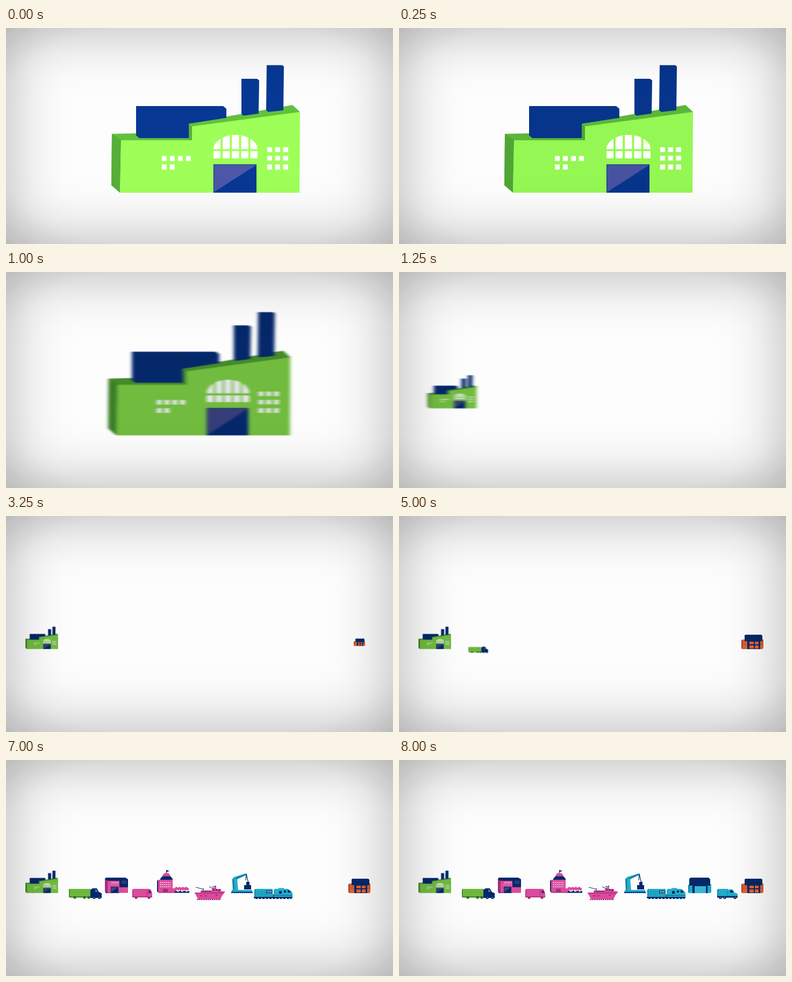
These frames come from a looping animation (720 px wide and 404 px high, 9120 ms). An HTML page without scripts:

```html
<!DOCTYPE html>
<html lang="en">
<head>
<meta charset="utf-8">
<title>Supply chain</title>
<style>
html, body { margin: 0; width: 100%; height: 100%; overflow: hidden; background: #fdfdfd }
svg { display: block; width: 100vw; height: 100vh }
.stage { position: relative; width: 100%; height: 100% }
.stage::after {
  content: ""; position: absolute; inset: 0;
  background: radial-gradient(ellipse 75% 75%, transparent 72%, rgba(0,0,0,.07));
  box-shadow: inset 0 0 110px 6px rgba(0,0,0,.28);
}

.navy { fill: #05286a } .green { fill: #71bb3f } .shade { fill: #458a2c }
.pink { fill: #dc4a9c } .plum { fill: #a32d78 }
.teal { fill: #22aecb } .deep { fill: #12809f }
.orange { fill: #e2622f } .pane { fill: #e6e6ee }
.line { fill: none; stroke: #05286a }
.row { fill: none; stroke: #e6e6ee }

@property --p { syntax: "<number>"; inherits: true; initial-value: 0 }
.smear, .fly, .pop { animation: 9.12s step-end infinite }
.smear { animation-name: smear }
.fly {
  animation-name: fly;
  transform: translate(calc(1.8px * var(--p)), calc(195px * var(--p))) scale(calc(1 - .8255 * var(--p)));
}
.glow { animation: glow 9.12s infinite }
.pop { transform-box: fill-box; transform-origin: 50% 55% }

@keyframes glow {
  0% { filter: brightness(1.4); animation-timing-function: steps(5, end) }
  6.9%, 100% { filter: brightness(1) }
}
@keyframes fly {
  0% { --p: 0 } 10.96% { --p: .04 } 12.38% { --p: .5 } 13.7% { --p: .895 }
  15.12% { --p: .975 } 16.44% { --p: .995 } 17.86%, 100% { --p: 1 }
}
@keyframes smear {
  0% { filter: none } 10.96% { filter: url(#soft) } 12.38% { filter: url(#fast) }
  13.7% { filter: url(#soft) } 15.12%, 100% { filter: none }
}
/* one pop each: hidden, small, overshoot, rest */
@keyframes shop { 0% { transform: scale(0) } 35.62% { transform: scale(.51) } 37.04% { transform: scale(1.08) } 38.36%, 100% { transform: none } }
@keyframes lorry { 0% { transform: scale(0) } 54.8% { transform: scale(.6) } 56.2% { transform: scale(1.08) } 57.5%, 100% { transform: none } }
@keyframes depot { 0% { transform: scale(0) } 58.9% { transform: scale(.6) } 60.3% { transform: scale(1.08) } 61.7%, 100% { transform: none } }
@keyframes van { 0% { transform: scale(0) } 61.7% { transform: scale(.6) } 63% { transform: scale(1.08) } 64.4%, 100% { transform: none } }
@keyframes customs { 0% { transform: scale(0) } 65.78% { transform: scale(.66) } 67.2% { transform: scale(1.08) } 68.5%, 100% { transform: none } }
@keyframes ship { 0% { transform: scale(0) } 68.52% { transform: scale(.6) } 69.9% { transform: scale(1.08) } 71.2%, 100% { transform: none } }
@keyframes crane { 0% { transform: scale(0) } 69.9% { transform: scale(.6) } 71.2% { transform: scale(1.08) } 72.6%, 100% { transform: none } }
@keyframes train { 0% { transform: scale(0) } 72.6% { transform: scale(.6) } 74% { transform: scale(1.08) } 75.4%, 100% { transform: none } }
@keyframes store { 0% { transform: scale(0) } 78.1% { transform: scale(.6) } 79.5% { transform: scale(1.08) } 80.9%, 100% { transform: none } }
@keyframes pickup { 0% { transform: scale(0) } 83.6% { transform: scale(.6) } 85% { transform: scale(1.08) } 86.3%, 100% { transform: none } }
</style>
</head>
<body>
<div class="stage">
<svg viewBox="0 0 720 404" preserveAspectRatio="none">
  <defs>
    <filter id="soft" x="-20%" y="-10%" width="140%" height="120%" color-interpolation-filters="sRGB"><feGaussianBlur stdDeviation="3.2 .5"/></filter>
    <filter id="fast" x="-20%" y="-10%" width="140%" height="120%" color-interpolation-filters="sRGB"><feGaussianBlur stdDeviation="13 1.5"/></filter>
    <clipPath id="arch"><ellipse cx="427" cy="227" rx="41" ry="27"/></clipPath>
    <g id="wheel"><circle r="2.6" class="navy"/><circle r="1" fill="#8fa0c4"/></g>
  </defs>

  <!-- factory -->
  <g class="smear"><g class="fly"><g class="glow">
    <path class="shade" d="M197 198L243 197 340 204 346 184 340 178 533 144 547 157 346 212H214L212 308 196 294Z"/>
    <path fill="#3d7d28" d="M197 198L214 210 212 308 196 294ZM340 178L346 184V211L340 207Z"/>
    <path class="green" d="M214 210H346V184L547 157 546 308H212Z"/>
    <path class="navy" d="M242 146H404L410 151V168L340 179V206H248L242 201ZM438 95H467L471 98 470 160 442 164 438 161ZM485 69.500H514L517 72 516 154 488 157 484 154Z"/>
    <g class="row" stroke-width="9">
      <path stroke-dasharray="9 6" d="M290 244H344M290 260H314"/>
      <path stroke-dasharray="9 5.800" d="M486 227.500H524.600M486 243.500H524.600M486 260H524.600"/>
    </g>
    <path class="row" stroke-width="13" stroke-dasharray="13 4.200" d="M386 237H468"/>
    <path class="row" stroke-width="27" stroke-dasharray="13 4.200" d="M386 213H468" clip-path="url(#arch)"/>
    <path class="navy" d="M386 255H466V308H386Z"/>
    <path fill="#363e79" d="M387 256H466L387 307Z"/>
  </g></g></g>

  <!-- shop -->
  <g class="pop" style="animation-name:shop">
    <path class="orange" d="M637 232L640 231H678V247L676 249H639L637 247Z"/>
    <path class="navy" d="M643 223L645 222H674L676 224V234H672V249H648V234H643Z"/>
    <path fill="#9b3c2c" d="M637 232L639 233V249L637 247Z"/>
    <path class="orange" d="M652 235H660V240H652ZM662 235H669V240H662ZM652 242H660V248H652ZM662 242H669V248H662Z"/>
    <path class="line" stroke-width="1" stroke-dasharray="1 2" d="M641 236H648M641 240H648M673 236H678M673 240H678"/>
  </g>

  <!-- green lorry -->
  <g class="pop" style="animation-name:lorry">
    <path class="shade" d="M117 242L119 241V257H117ZM119 254H160V257.500H119Z"/>
    <path class="green" d="M119 241H157L159 243V255H119Z"/>
    <path fill="none" stroke="#5aa336" stroke-width="9" stroke-dasharray=".7 3" d="M122 248H158"/>
    <path class="navy" d="M157 243L161 240H169L173 247 178 249V258H157Z"/>
    <path fill="#4d69a5" d="M166 242H168.500L171 247H166Z"/>
    <g fill="#2f6b24"><circle cx="128" cy="257" r="2.700"/><circle cx="146" cy="257" r="2.700"/><circle cx="154" cy="257" r="2.700"/></g>
    <use href="#wheel" x="164" y="257.500"/><use href="#wheel" x="174" y="257.500"/>
  </g>

  <!-- depot -->
  <g class="pop" style="animation-name:depot">
    <path class="navy" d="M184 222L186 220H222L227 223V240H211V249H186L184 246Z"/>
    <path class="pink" d="M189 226H211V238H227V248.500H189Z"/>
    <path class="plum" d="M184 223L189 226V248.500L184 246Z"/>
    <path class="row" stroke-width="2.500" stroke-dasharray="2 .8" stroke-opacity=".65" d="M196 229.500H210"/>
    <path class="row" stroke-width="1" stroke-dasharray="1.500 1.500" stroke-opacity=".7" d="M216 227H225M216 230H225M194 233.500H210"/>
    <path class="navy" d="M195 237H209V248.500H195Z"/>
    <path fill="#3c4582" d="M196 238H208L196 247Z"/>
  </g>

  <!-- pink van -->
  <g class="pop" style="animation-name:van">
    <path class="pink" d="M235 243L237 241H267L270 243 272 250V257H235Z"/>
    <path class="plum" d="M235 243L236.500 242V257H235ZM262 243H263V256H262ZM236 255.500H272V257H236Z"/>
    <path class="navy" d="M265 244H268.500L270.500 249H265Z" opacity=".75"/>
    <g class="plum"><circle cx="242" cy="257.500" r="2.500"/><circle cx="266" cy="257.500" r="2.500"/></g>
  </g>

  <!-- customs house and pier -->
  <g class="pop" style="animation-name:customs">
    <path class="line" d="M298.500 206V212"/>
    <path class="navy" d="M298 205.500L304 207.500 298 210Z"/>
    <path class="pink" d="M291 218Q292 211 298.500 211T306 218Z"/>
    <path class="navy" d="M287 222L291 217.500H306L310 222V225H287ZM281 226L284 224V248L281 246Z"/>
    <path class="pink" d="M283 224H310V248H283ZM310 240H315V248H310Z"/>
    <path class="row" stroke-width="1.800" stroke-dasharray="1.800 2" d="M287 229H307M287 233H307M287 237H307"/>
    <path class="plum" d="M292 241H301V248H292ZM283 247H314V248.500H283Z"/>
    <path class="pink" d="M314 239L317 237 320 239 323 237 326 239 329 237 332 239 335 237 340 240V243H314Z"/>
    <path fill="none" stroke="#dc4a9c" stroke-width="4" stroke-dasharray="1.500 3" d="M315 243H340"/>
    <path class="navy" d="M314 246Q316 243.500 318 245.500T322 245.500 326 245.500 330 245.500 334 245.500 338 245.500L341 245V248.500H314Z"/>
  </g>

  <!-- ship -->
  <g class="pop" style="animation-name:ship">
    <path class="line" d="M353 238L368 242M367 240V248M385 240L378 237M390 234.500V241M384 236.500H391"/>
    <path class="pink" d="M351 248H362V244H383V240L386 238H391V241H400V245L408 246 402 254 399 260H357Z"/>
    <path class="navy" d="M385 242H388V244H385ZM390 242H393V244H390ZM395 243H398V245H395ZM364 245H382V246H364Z"/>
    <path class="plum" d="M351 248H405L404 249.500H352ZM361 253H365V255H361ZM369 253H373V255H369ZM390 252H394V254H390Z"/>
    <path fill="none" stroke="#a32d78" stroke-width="2" stroke-dasharray="3 1" d="M355 261H400"/>
  </g>

  <!-- crane -->
  <g class="pop" style="animation-name:crane">
    <path class="teal" d="M421 223L424 219 446 212 448 214 430 222 432 244H423Z"/>
    <path class="deep" d="M421 223L424 222 425 244H422ZM426 221L446 213 447 215 430 223Z"/>
    <path class="line" stroke-width="1.200" d="M447 213L451 230M447 214L446 225"/>
    <path class="navy" d="M447 228H453V234H456V242H443V234H447Z"/>
    <path class="teal" d="M420 243H458V247H420Z"/>
    <path class="navy" d="M419 246.500H459V249H419Z"/>
    <path fill="none" stroke="#22aecb" stroke-dasharray="2 2" d="M421 248H458"/>
  </g>

  <!-- train -->
  <g class="pop" style="animation-name:train">
    <path class="teal" d="M462 243L464 241H496V257H462ZM498 243L500 241H507V239.500H517V241H524Q530 243 533 249V257H498Z"/>
    <path class="deep" d="M462 243L464 241.500V257H462ZM496 251H499V256H496ZM499 252H533V254H499Z"/>
    <path fill="none" stroke="#12809f" stroke-width="11" stroke-dasharray=".8 2.600" d="M467 249.500H496"/>
    <path class="navy" d="M484 244H496V249H484ZM524 243Q528 244 530 248H524ZM508 245H513V250H508ZM517 244H521V248H517ZM461 256H533V258.500H461Z"/>
    <path class="row" stroke-width="2.500" stroke-dasharray="1.800 1" d="M485.500 246.500H495"/>
    <path class="line" stroke-width="2.500" stroke-dasharray="4 2.500" d="M464 258.800H531"/>
  </g>

  <!-- store -->
  <g class="pop" style="animation-name:store">
    <path class="teal" d="M538 234L540 232H581V247L579 249H540L538 247Z"/>
    <path class="navy" d="M540 222L543 220H576L579 223V235H574V249H546V235H540Z"/>
    <path class="deep" d="M538 234L540 235V249L538 247Z"/>
    <path class="teal" d="M550 236H571V249H550Z"/>
    <path fill="none" stroke="#9fdbe8" stroke-width="1" stroke-dasharray="1.500 1.500" d="M551 238H571M551 241H571M551 244H571M551 247H571"/>
    <path class="line" stroke-dasharray="1 2" d="M541 239H546M541 243H546M575 239H580M575 243H580"/>
  </g>

  <!-- pickup -->
  <g class="pop" style="animation-name:pickup">
    <path class="teal" d="M592 243L594 241H612V255H592ZM612 243L614 242H621L624 248 630 250V256H612Z"/>
    <path class="deep" d="M592 243L594 241.500V255H592ZM611 242H612V255H611Z"/>
    <path class="navy" d="M616 244H620.500L622.500 248H616ZM592 254.500H630V257.500H592Z"/>
    <use href="#wheel" x="598" y="257.500"/><use href="#wheel" x="606" y="257.500"/><use href="#wheel" x="625" y="257.500"/>
  </g>
</svg>
</div>
</body>
</html>
```
